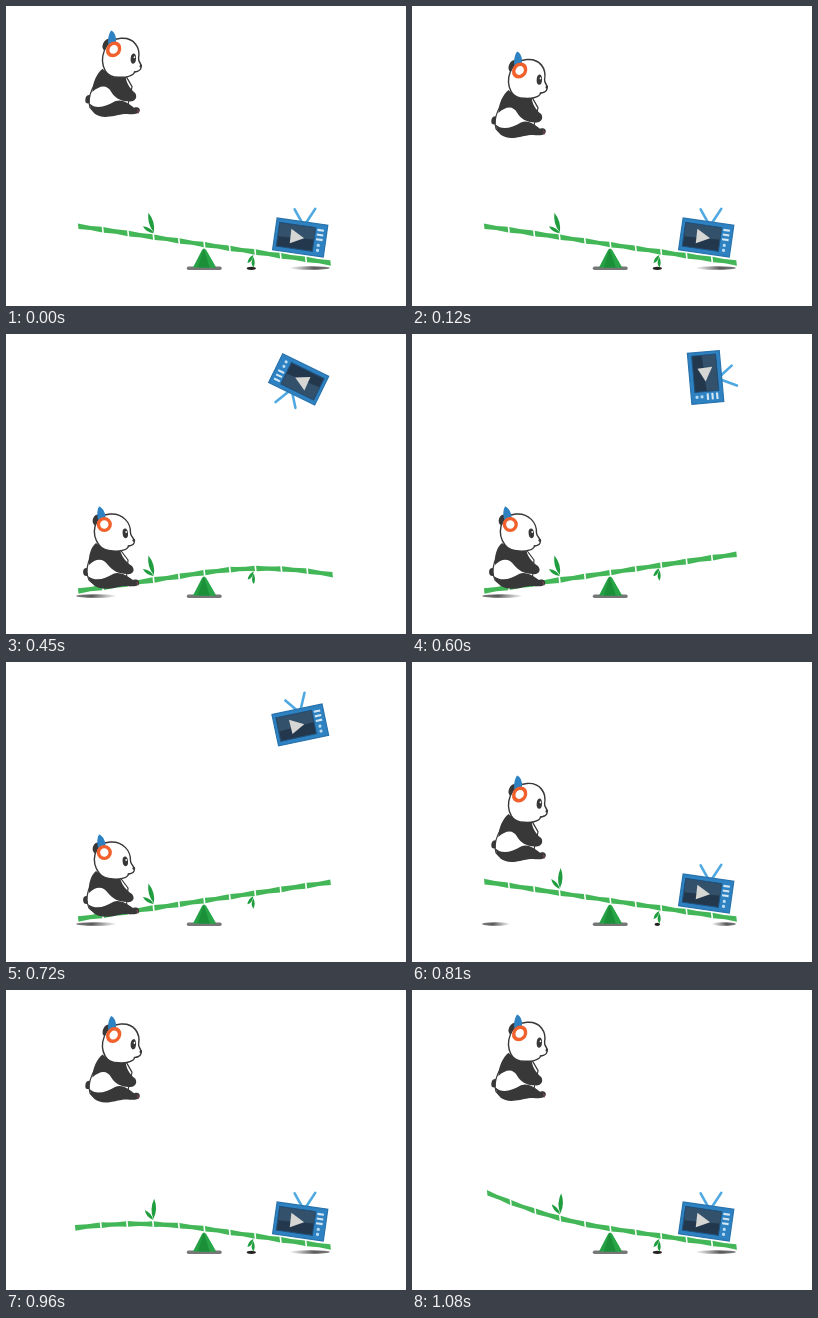
Recreate the animation shown at these times as an HTML page with a canvas. Size 400 by 300 pixels, loop 1110 ms.

```html
<!DOCTYPE html>
<html lang="en">
<head>
<meta charset="utf-8">
<title>Seesaw</title>
<style>
html, body { margin: 0; width: 100%; height: 100%; overflow: hidden; background: #fff; }
canvas { display: block; width: 400px; height: 300px; }
</style>
</head>
<body>
<canvas id="stage" width="400" height="300"></canvas>
<script>
const ctx = document.getElementById('stage').getContext('2d');
const LOOP = 1110, STEP = 30;
const GREEN = '#43b757', LEAF = '#1f9d3f', BLACK = '#383838', BLUE = '#2e82c2';

const clamp = v => Math.max(0, Math.min(1, v));
const part = (t, a, b) => clamp((t - a) / (b - a));
const mix = (a, b, p) => a + (b - a) * p;
const expoOut = p => p >= 1 ? 1 : 1 - 2 ** (-10 * p);
const expoIn = p => p <= 0 ? 0 : 2 ** (10 * (p - 1));

// Linear interpolation through [time, value] keys
function track(t, keys) {
  for (let i = 1; i < keys.length; i++) {
    const [t0, v0] = keys[i - 1], [t1, v1] = keys[i];
    if (t <= t1) return mix(v0, v1, part(t, t0, t1));
  }
  return keys[keys.length - 1][1];
}

function shape(d, fill, stroke, width = 1) {
  const p = new Path2D(d);
  if (fill) { ctx.fillStyle = fill; ctx.fill(p); }
  if (stroke) { ctx.strokeStyle = stroke; ctx.lineWidth = width; ctx.stroke(p); }
}

function oval(x, y, rx, ry, fill, angle = 0) {
  ctx.beginPath();
  ctx.ellipse(x, y, rx, ry, angle, 0, Math.PI * 2);
  ctx.fillStyle = fill;
  ctx.fill();
}

function line(x1, y1, x2, y2, color, width) {
  ctx.beginPath();
  ctx.moveTo(x1, y1);
  ctx.lineTo(x2, y2);
  ctx.strokeStyle = color;
  ctx.lineWidth = width;
  ctx.stroke();
}

// Distance of the panda below its highest point
function pandaDrop(t) {
  if (t < 792) return 144 * part(t, 30, 265) ** 2;
  return 144 * (1 - expoOut(part(t, 792, 1052)));
}

function tvPose(t, tilt) {
  const onPlank = mix(207, 231.5, (tilt + 1) / 2);
  if (t <= 265 || t >= 792) return { x: 294.2, y: onPlank, turn: 8.2 * tilt };
  const turn = track(t, [[265, -8.2], [270, -20], [450, -154], [720, -372], [780, -368]]);
  const x = track(t, [[265, 294], [270, 291.5], [450, 292.7], [720, 294.3]]);
  let y;
  if (t < 270) y = mix(207, 198, part(t, 265, 270));
  else if (t < 570) y = mix(198, 43, expoOut(part(t, 270, 570)));
  else y = mix(43, 231.5, expoIn(part(t, 570, 792)));
  return { x, y, turn };
}

function plankTilt(t) {
  if (t < 400) return 1 - 2 * clamp((pandaDrop(t) - 107) / 37);
  return mix(-1, 1, part(t, 783, 800));
}

// Springy whip of a freed plank end
function whip(t, start, size) {
  const s = t - start;
  if (s < 0 || s > 330) return 0;
  return size * Math.min(1, s / 135) * Math.sin(2 * Math.PI * s / 220);
}

function plankPoint(s, tilt, left, right) {
  const r = s / 127;
  const lift = (s < 0 ? left : right) * r * r;
  const pull = s < 0 ? 0.17 : -0.1;
  return [198.4 + s + lift * pull, 238.6 + s * 0.146 * tilt - lift];
}

function drawPlank(at) {
  const seg = 25.4;
  ctx.fillStyle = GREEN;
  for (let i = 0; i < 10; i++) {
    const a = -127 + i * seg + 0.9, b = a + seg - 1.8;
    const [ax, ay] = at(a), [mx, my] = at((a + b) / 2), [bx, by] = at(b);
    ctx.beginPath();
    ctx.moveTo(ax - 0.4, ay - 2.8);
    ctx.quadraticCurveTo(mx, my - 1.5, bx - 0.2, by - 2.8);
    ctx.lineTo(bx + 0.4, by + 2.8);
    ctx.quadraticCurveTo(mx, my + 1.5, ax + 0.2, ay + 2.8);
    ctx.fill();
  }
}

function drawLeaves([x, y], degrees) {
  ctx.save();
  ctx.translate(x, y - 5);
  ctx.rotate(degrees * Math.PI / 180);
  shape('M0 0Q-7 -8 -5.5 -19.5Q1.5 -11 0 0Z', LEAF);
  shape('M0 1Q-8 0 -11 -6Q-3 -5 0 1Z', LEAF);
  ctx.restore();
}

function drawLowLeaves([x, y]) {
  ctx.save();
  ctx.translate(x - 1, y + 3);
  shape('M0 0Q-5 2 -6 8Q-1 7 0 0Z', LEAF);
  shape('M0 2Q-3.5 8 0 12.5Q2.5 8 0 2Z', LEAF);
  ctx.restore();
}

function drawShadow(edge, dir, size) {
  if (size <= 0) return;
  const w = 40 * size;
  const g = ctx.createLinearGradient(edge, 0, edge + dir * w, 0);
  g.addColorStop(0, 'rgba(60,60,60,.65)');
  g.addColorStop(0.4, 'rgba(60,60,60,.85)');
  g.addColorStop(1, 'rgba(90,90,90,.05)');
  oval(edge + dir * w / 2, 262, w / 2, 1.8, g);
}

function drawFulcrum() {
  ctx.lineCap = 'round';
  line(182.5, 262.3, 214, 262.3, '#777', 3.4);
  shape('M187 261.5L196 244Q198 241 200 244L210 261.5Z', '#25a044');
  shape('M192 261.5L197.5 243L204 261.5Z', '#1b9038');
  shape('M198 243L204 261.5H210L200 244Z', '#28a647');
}

function drawTv({ x, y, turn }) {
  ctx.save();
  ctx.translate(x, y);
  ctx.rotate(turn * Math.PI / 180);
  ctx.lineCap = 'round';
  line(-1, -16, -9.5, -27, '#4fa9e0', 2.6);
  line(4, -16, 10.8, -30.5, '#4fa9e0', 2.6);
  ctx.lineCap = 'butt';
  shape('M-25.6 -16H25.6V16H-25.6Z', BLUE, '#2872ad', 1.2);
  shape('M-22.5 -12H14V12H-22.5Z', '#24384d', '#1f527f', 1);
  shape('M-22 -11.5H13.5V0L-22 2Z', '#34516b');
  shape('M-10 -7.5L4 0.3L-9.5 7.3Z', '#d6d6d4');
  for (const by of [-10, -5.3, -0.6]) line(16, by, 22.5, by, '#d4e7f4', 2.1);
  oval(19, 5.3, 1.6, 1.6, '#b9dcf2');
  oval(19, 10.3, 1.6, 1.6, '#b9dcf2');
  ctx.restore();
}

function drawPanda(drop) {
  const air = 1 - clamp((drop - 107) / 37);
  ctx.save();
  ctx.translate(104, 109 + drop);
  ctx.transform(1, 0, -0.15 * air, 1 + 0.05 * air, 0, 0);
  ctx.translate(-104, -253);
  ctx.lineJoin = 'round';
  oval(80.5, 238, 3.4, 4, BLACK);
  shape('M92 212C83 222 78 236 83 246C90 254 110 254 120 249L122 226L113 214Z', '#fff', BLACK, 1.2);
  // legs
  shape('M82 242C89 248 99 245 107 240C114 237 121 242 127 246C131 244.5 134 247 133 250C132 252.5 127 252.5 121 252C114 252 110 254 104 254.5C93 256 85 252 82 242Z', BLACK);
  line(131, 248, 132, 251, '#8d4a50', 1);
  // shoulders and arm
  shape('M90 209C97 215 106 217 114 215C115 222 120 228 126 232C129.5 236 127 241 121 240C112 240 106 236 102 231C97 224 90 224 83 231C82 222 85 213 90 209Z', BLACK);
  oval(91, 186, 4.2, 5.7, BLACK, 0.3);
  // head
  shape('M93 211C85 200 87 181 104 180C117 179 125 189 124.5 199C124.5 203 129 204 128.3 208C128 211.5 125 211.5 122.5 212C122 216 114 217.5 107 217C101 217 96 215 93 211Z', '#fff', BLACK, 1.4);
  oval(127.8, 206.3, 1.3, 1.5, BLACK);
  oval(119.3, 199.3, 2.7, 4.9, BLACK, -0.1);
  oval(120.2, 198, 0.8, 1, '#fff');
  line(122, 212, 125.5, 211.4, BLACK, 1.1);
  // headphones
  shape('M93 172.5C97 173.5 100 180 99.5 185L93 188C91 183 90.5 177 93 172.5Z', BLUE);
  ctx.beginPath();
  ctx.arc(98.3, 190.5, 5.9, 0, Math.PI * 2);
  ctx.fillStyle = '#fff';
  ctx.fill();
  ctx.strokeStyle = '#f2602c';
  ctx.lineWidth = 3.4;
  ctx.stroke();
  ctx.restore();
}

function draw(t) {
  const tilt = plankTilt(t);
  const left = whip(t, 798, 18), right = whip(t, 270, 23);
  const at = s => plankPoint(s, tilt, left, right);
  const rightSide = t < 500 ? 1 - part(t, 240, 300) : part(t, 780, 830);
  const leftSide = t < 500 ? part(t, 240, 300) : 1 - part(t, 780, 876);
  const swing = track(t, [[240, 0], [270, 32], [390, 0], [780, 0], [810, 18]]);

  ctx.fillStyle = '#fff';
  ctx.fillRect(0, 0, 400, 300);
  drawShadow(70, 1, leftSide);
  drawShadow(324, -1, rightSide);
  if (rightSide > 0) oval(245.3, 262.3, 4.6 * rightSide, 1.6, '#222');
  drawLeaves(at(-50.5), swing);
  drawLowLeaves(at(50));
  drawFulcrum();
  drawPlank(at);
  drawTv(tvPose(t, tilt));
  drawPanda(pandaDrop(t));
}

const start = performance.now();
function tick() {
  const t = (performance.now() - start) % LOOP;
  draw(Math.floor(t / STEP) * STEP);
  requestAnimationFrame(tick);
}
tick();
</script>
</body>
</html>
```
